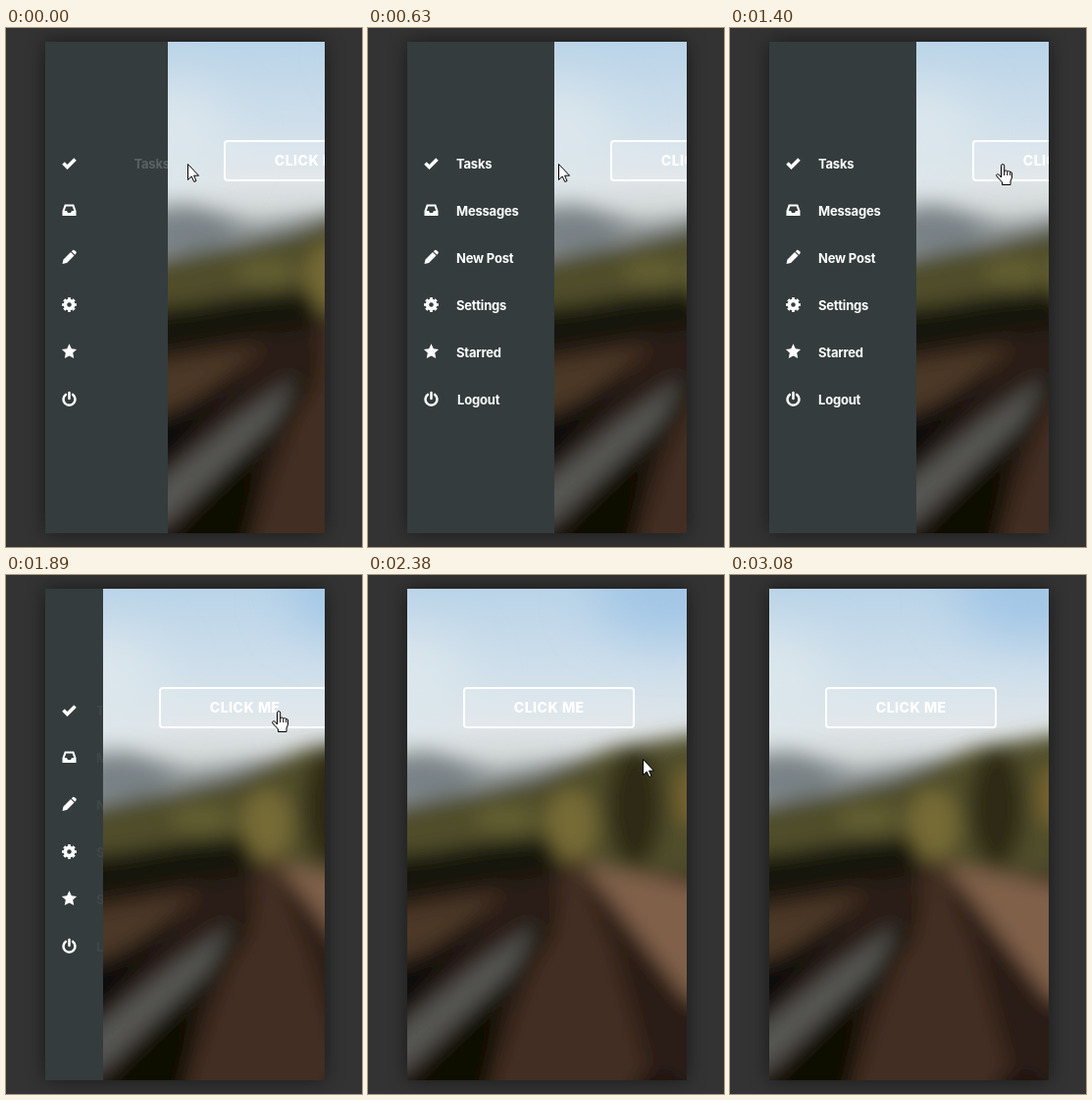
Animation, 363 px wide and 528 px high, one loop 3.71 s. Source, as an HTML page:

```html
<!DOCTYPE html>
<html lang="en">
<head>
<meta charset="utf-8">
<title>Slide menu</title>
<style>
html, body { margin: 0; width: 100%; height: 100%; overflow: hidden; background: #333; }
svg { display: block; }
#stage { width: 363px; height: 528px; }
text { font-family: Inter, "Open Sans", sans-serif; fill: #fff; }
#labels text { font-size: 13px; font-weight: 700; letter-spacing: -.2px; }
#button text { font-size: 14px; font-weight: 800; letter-spacing: .5px; text-anchor: middle; }
.line { fill: none; stroke: #fff; }
</style>
</head>
<body>
<svg id="stage" viewBox="0 0 363 528">
  <defs>
    <linearGradient id="sky" x2="0" y2="1">
      <stop stop-color="#bad4e8"/>
      <stop offset=".17" stop-color="#cfdfeb"/>
      <stop offset=".28" stop-color="#dfe5e8"/>
      <stop offset=".36" stop-color="#d0d4d4"/>
    </linearGradient>
    <filter id="soft" x="-30%" y="-30%" width="160%" height="160%"><feGaussianBlur stdDeviation="10"/></filter>
    <filter id="haze" x="-100%" y="-100%" width="300%" height="300%"><feGaussianBlur stdDeviation="26"/></filter>
  </defs>

  <rect x="40" y="14" width="285" height="500" opacity=".5" filter="url(#soft)"/>

  <svg x="40" y="14" width="285" height="500" viewBox="40 14 285 500">
    <rect x="40" y="14" width="285" height="500" fill="#343c3d"/>
    <g fill="#fff">
      <path class="line" stroke-width="3.6" transform="translate(64.5 137.5)" d="M-6 0L-2 4 6-4"/>
      <path transform="translate(64.5 185)" fill-rule="evenodd" d="M-7 1L-4.7-5.5H4.7L7 1V6H-7ZM-4.8 1H-2.5L-1.5 3H1.5L2.5 1H4.8L3.2-3.5H-3.2Z"/>
      <path transform="translate(64.5 233)" d="M-7 7L-6 2.5 1.5-5 5-1.5-2.5 6ZM2.3-5.8L4-7.3Q5-7.6 7-5.5 7.6-4.5 7-3.7L5.8-2.3Z"/>
      <g transform="translate(64.5 281.5)" class="line">
        <circle r="4.1" stroke-width="3.6"/>
        <circle r="6" stroke-width="2.8" pathLength="16" stroke-dasharray="1.15 .85" stroke-dashoffset=".57"/>
      </g>
      <path transform="translate(64.5 329)" d="M0-7.8L2.3-2.7 7.6-2.1 3.7 1.6 4.7 7 0 4.4-4.7 7-3.7 1.6-7.6-2.1-2.3-2.7Z"/>
      <path class="line" stroke-width="2.5" stroke-linecap="round" transform="translate(64.5 377.5)" d="M-3.6-4.6A6 6 0 1 0 3.6-4.6M0-6.5V-.5"/>
    </g>
    <g id="labels"></g>

    <svg id="photo" x="40" y="14" width="285" height="500" viewBox="40 14 285 500">
      <rect x="40" y="14" width="285" height="500" fill="url(#sky)"/>
      <g filter="url(#haze)">
        <ellipse cx="310" cy="14" rx="80" ry="50" fill="#a2c6e6"/>
        <ellipse cx="40" cy="110" rx="60" ry="50" fill="#dce7ec"/>
      </g>
      <g id="land" filter="url(#soft)"></g>
      <g id="button">
        <rect x="98" y="115" width="173" height="40" rx="3" fill="#fff" fill-opacity=".12" stroke="#fff" stroke-width="2"/>
        <text x="184.7" y="140">CLICK ME</text>
      </g>
    </svg>
  </svg>

  <g id="cursor" fill="#fff" stroke="#000">
    <path id="arrow" transform="translate(-1)" d="M.5.5V16.5L4.2 13 6.8 18.5 9 17.5 6.6 12.2H11.5Z"/>
    <path id="hand" transform="translate(-5)" stroke-linejoin="round" d="M5.5 14V2.2a1.6 1.6 0 0 1 3.2 0V8q.3-1 1.6-1 1.4 0 1.5 1.4.3-.8 1.5-.8 1.3 0 1.5 1.4.3-.5 1-.5.7.1.7 1.6V14L15 18V21.5H6.5V19L1 13Q.2 11.5 1.3 10.8 2.6 10.4 4 12ZM8.7 8V12M11.8 8.5V12M14.7 9V12"/>
  </g>
</svg>

<script>
const LOOP = 3710, STEP = 70, MENU = 150, SLIDE = 300;
const OPEN_AT = -160, CLOSE_AT = 1785, HOLD_END = 1890;
const $ = id => document.getElementById(id);

function add(parent, tag, attrs) {
  const el = document.createElementNS("http://www.w3.org/2000/svg", tag);
  for (const key in attrs) el.setAttribute(key, attrs[key]);
  return parent.appendChild(el);
}

// Blurred landscape, painted back to front.
const blob = (cx, cy, rx, ry, fill) => add($("land"), "ellipse", { cx, cy, rx, ry, fill });
const shape = (points, fill) => add($("land"), "polygon", { points, fill });
shape("0,186 60,178 130,198 220,186 380,160 380,300 0,300", "#8d9496");
blob(60, 208, 45, 18, "#788186");
shape("0,240 90,224 170,206 250,176 380,154 380,340 0,340", "#504d2a");
blob(140, 248, 32, 14, "#625f31");
blob(207, 254, 26, 36, "#766b34");
blob(272, 236, 28, 62, "#2e2b14");
blob(330, 225, 16, 32, "#78632f");
shape("0,288 60,282 120,272 185,266 200,300 150,330 0,345", "#19160a");
shape("0,335 200,303 380,305 380,600 0,600", "#2a1e14");
shape("0,345 140,322 60,385 0,400", "#4c3725");
shape("203,288 225,290 300,560 110,560 160,420", "#422f21");
shape("0,412 125,350 0,485", "#0c0a08");
shape("195,318 185,370 135,440 118,560 0,560 150,400", "#090705");
shape("172,355 148,402 40,502 10,510 10,478 110,398", "#565753");
shape("218,293 380,325 380,450 325,430", "#80604a");
shape("217,302 325,440 380,500 300,500", "#2b1e14");
blob(295, 522, 26, 14, "#15100b");

const labels = ["Tasks", "Messages", "New Post", "Settings", "Starred", "Logout"].map((name, i) => {
  const el = add($("labels"), "text", { y: 142.5 + 48 * i });
  el.textContent = name;
  return el;
});

// The CSS "ease" curve: cubic-bezier(.25, .1, .25, 1).
function ease(p) {
  if (p <= 0) return 0;
  if (p >= 1) return 1;
  const bez = (a, b, u) => 3 * a * u * (1 - u) ** 2 + 3 * b * u * u * (1 - u) + u ** 3;
  let lo = 0, hi = 1;
  for (let i = 0; i < 20; i++) {
    const mid = (lo + hi) / 2;
    if (bez(.25, .25, mid) < p) lo = mid; else hi = mid;
  }
  return bez(.1, 1, lo);
}

// Pointer path: time, x, y, exponent of the move that ends there.
const path = [
  [0, 186, 138, 1], [560, 186, 138, 1], [1120, 255, 138, 1], [1400, 276, 138, .8],
  [2170, 276, 138, 1], [2380, 281, 187, 2], [2730, 284, 414, 1], [3080, 319, 536, 1.2]
];

function pointer(t) {
  const i = path.findIndex(k => k[0] > t);
  if (i < 0) return path[path.length - 1].slice(1, 3);
  const [t0, x0, y0] = path[i - 1], [t1, x1, y1, power] = path[i];
  const p = ((t - t0) / (t1 - t0)) ** power;
  return [Math.round(x0 + (x1 - x0) * p), Math.round(y0 + (y1 - y0) * p)];
}

function draw(t) {
  const closing = t >= HOLD_END;
  const shift = MENU * (closing ? 1 - ease((t - CLOSE_AT) / SLIDE) : ease((t - OPEN_AT) / SLIDE));
  $("photo").setAttribute("x", 40 + Math.round(shift));

  labels.forEach((el, i) => {
    const p = ease((t + 58 - 76 * i) / 380);
    el.setAttribute("x", closing ? 92 : 90 + 50 * (1 - p));
    el.setAttribute("opacity", closing ? .05 : p);
  });

  const [x, y] = pointer(t);
  const overMenu = x < 40 + shift;
  const overButton = x >= 97 + shift && x < 272 + shift && y >= 114 && y < 156;
  const link = overMenu || overButton;
  $("hand").style.display = link ? "" : "none";
  $("arrow").style.display = link ? "none" : "";
  $("cursor").setAttribute("transform", `translate(${x} ${y})`);
}

const start = performance.now();
function tick() {
  const t = (performance.now() - start) % LOOP;
  draw(Math.floor(t / STEP) * STEP);
  requestAnimationFrame(tick);
}
tick();
</script>
</body>
</html>
```
